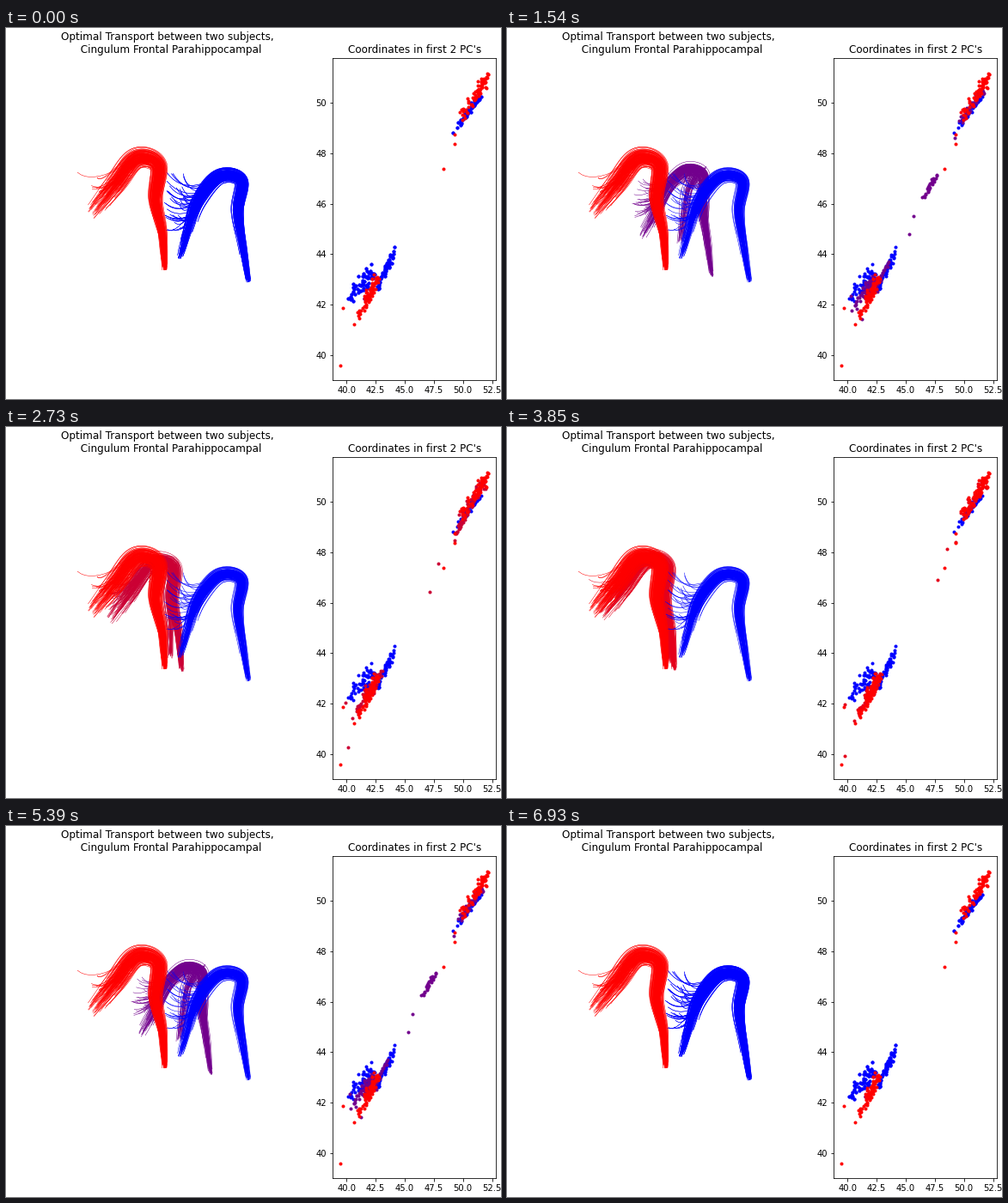
Recreate the animation shown at these times as a matplotlib script. Size 576 by 432 pixels, loop 7 s.

```python
import numpy as np
import matplotlib.pyplot as plt
from matplotlib.animation import FuncAnimation
from matplotlib.collections import LineCollection

W, H, DPI = 576, 432, 72
FRAMES, STEP = 100, 70
N_CROSS, N_LOW, N_UP = 28, 76, 46
N = N_CROSS + N_LOW + N_UP

rng = np.random.default_rng(12)

# Key points of each centre line, from the foot of the leg to the arm's tip.
BLUE_PATH = np.array([(282, 296), (275, 254), (269, 213), (273, 178),
                      (248, 174), (224, 202), (212, 236), (202, 269)])
RED_PATH = np.array([(185, 282), (182, 240), (174, 200), (177, 160),
                     (152, 152), (127, 182), (97, 219)])


def spline(pts, u):
    """Catmull-Rom curve through pts at u in 0..1."""
    p = np.vstack([2 * pts[0] - pts[1], pts, 2 * pts[-1] - pts[-2]])
    s = np.clip(u, 0, 1) * (len(pts) - 1)
    i = np.minimum(s.astype(int), len(pts) - 2)
    f = (s - i)[:, None]
    a, b, c, d = p[i], p[i + 1], p[i + 2], p[i + 3]
    return 0.5 * (2 * b + (c - a) * f + (2 * a - 5 * b + 4 * c - d) * f**2
                  + (3 * b - a - 3 * c + d) * f**3)


class Bundle:
    def __init__(self, path, swell, taper):
        self.path, self.swell, self.taper = path, swell, taper

    def strand(self, start, end, tip=None, leave=0.0):
        """One fibre beside the centre line, optionally bending off to a tip."""
        u = np.linspace(start, end, 60)
        d = spline(self.path, u + 0.01) - spline(self.path, u - 0.01)
        d /= np.hypot(d[:, 0], d[:, 1])[:, None]
        normal = np.column_stack([-d[:, 1], d[:, 0]])
        half = 2.3 + self.swell * np.sin(np.pi * (self.taper * u) ** 1.3)
        off = half * np.clip(rng.normal(0, 0.55), -1.2, 1.2)
        off += rng.uniform(0.3, 1) * np.sin(rng.uniform(8, 30) * u
                                            + rng.uniform(0, 6.3))
        xy = spline(self.path, u) + normal * off[:, None]
        if tip is not None:
            s = np.clip((u - leave) / (end - leave), 0, 1)[:, None] ** 1.2
            xy = xy * (1 - s) + np.array(tip) * s
        return xy


blue = Bundle(BLUE_PATH, 5, 1)
red = Bundle(RED_PATH, 8, 0.8)


def blue_strand(i):
    if i < N_CROSS:
        return blue.strand(rng.uniform(0.74, 0.84), rng.uniform(0.27, 0.42))
    foot = 0.3 * rng.uniform() ** 2
    if i % 3 == 0:
        k = rng.uniform()
        tip = (rng.uniform(184, 208), 167 + 70 * k)
        leave = 0.64 + 0.16 * k
        return blue.strand(foot, leave + 0.1, tip, leave)
    return blue.strand(foot, rng.uniform(0.76, 1))


def red_strand(i):
    if i < N_CROSS:
        return red.strand(0.04 * rng.uniform(), rng.uniform(0.66, 0.86))
    foot = 0.06 * rng.uniform() ** 2
    if i == N - 1:
        return red.strand(foot, 0.9, (83, 168), 0.78)
    if i % 50 == 0:
        return red.strand(foot, 0.9, (106, 174), 0.5)
    if i % 9 == 0:
        tip = (rng.uniform(97, 114), rng.uniform(181, 199))
        return red.strand(foot, 0.88, tip, 0.74)
    return red.strand(foot, rng.uniform(0.82, 1))


def scatter(a, b, n, spread):
    """n points along a segment with some noise, ordered by x."""
    k = rng.uniform(0, 1, n)[:, None]
    p = np.array(a) * (1 - k) + np.array(b) * k + rng.normal(0, spread, (n, 2))
    return p[np.argsort(p[:, 0])]


def stack(*groups):
    p = np.vstack(groups)
    return p[np.argsort(p[:, 0])]


blue_lines = np.array([blue_strand(i) for i in range(N)])
red_lines = np.array([red_strand(i) for i in range(N)])

# Pairs that travel outside the clouds: x, y at the start and at the end.
strays = np.array([(42.8, 42.65, 48.3, 47.38), (42.7, 42.9, 49.25, 48.74),
                   (42.7, 42.95, 39.46, 39.57), (40.75, 42.7, 39.7, 41.87),
                   (49.12, 48.8, 49.3, 48.37), (40.15, 42.22, 40.65, 41.2)])
blue_pts = np.vstack([
    scatter((42.8, 43.0), (43.9, 43.9), N_CROSS, 0.07),
    stack(scatter((40.4, 42.3), (41.2, 43.1), 14, 0.1),
          scatter((41.0, 42.6), (42.4, 43.4), N_LOW - 36, 0.22),
          scatter((42.7, 42.65), (44.3, 44.45), 22, 0.06)),
    scatter((49.4, 49.0), (51.5, 50.3), N_UP, 0.08),
    strays[:, :2]])
red_pts = np.vstack([
    scatter((51.0, 50.2), (52.1, 51.1), N_CROSS, 0.06),
    stack(scatter((40.9, 41.4), (41.6, 42.0), 10, 0.08),
          scatter((41.6, 42.0), (42.7, 43.05), N_LOW - 16, 0.11),
          scatter((41.4, 42.3), (42.5, 43.3), 6, 0.05)),
    scatter((49.8, 49.4), (51.9, 50.95), N_UP, 0.13),
    strays[:, 2:]])

fig = plt.figure(figsize=(W / DPI, H / DPI), dpi=DPI, facecolor="white")

stage = fig.add_axes([0, 0, 1, 1])
stage.set(xlim=(0, W), ylim=(H, 0))
stage.axis("off")
stage.text(188, 29.2, "Optimal Transport between two subjects,\n"
           "  Cingulum Frontal Parahippocampal", fontsize=12, ha="center")

ax = fig.add_axes([380.2 / W, 1 - 410.2 / H, 190 / W, 375 / H])
ax.set(xlim=(38.83, 52.84), ylim=(38.99, 51.77),
       xticks=np.arange(40, 53, 2.5), yticks=np.arange(40, 51, 2))
ax.set_title("Coordinates in first 2 PC's", fontsize=12)


def add_lines(lines, color, z):
    col = LineCollection(lines, colors=[color], linewidths=0.5, zorder=z)
    stage.add_collection(col, autolim=False)
    return col


def add_dots(pts, color, z):
    return ax.plot(pts[:, 0], pts[:, 1], ".", color=color, ms=6, zorder=z)[0]


moving_lines = add_lines(blue_lines, "blue", 1)
add_lines(blue_lines, "blue", 2)
add_lines(red_lines, "red", 3)
add_dots(blue_pts, "blue", 2.1)
moving_dots = add_dots(blue_pts, "blue", 2.2)
add_dots(red_pts, "red", 2.3)


def update(i):
    """There and back at constant speed, resting one step at each end."""
    t = min(i, FRAMES - 1 - i) / (FRAMES // 2 - 1)
    color = (t, 0, 1 - t)
    moving_lines.set_segments((1 - t) * blue_lines + t * red_lines)
    moving_lines.set_color([color])
    p = (1 - t) * blue_pts + t * red_pts
    moving_dots.set_data(p[:, 0], p[:, 1])
    moving_dots.set_color(color)
    return moving_lines, moving_dots


anim = FuncAnimation(fig, update, frames=FRAMES, interval=STEP,
                     repeat=True, repeat_delay=0, blit=False)
plt.show()
```
